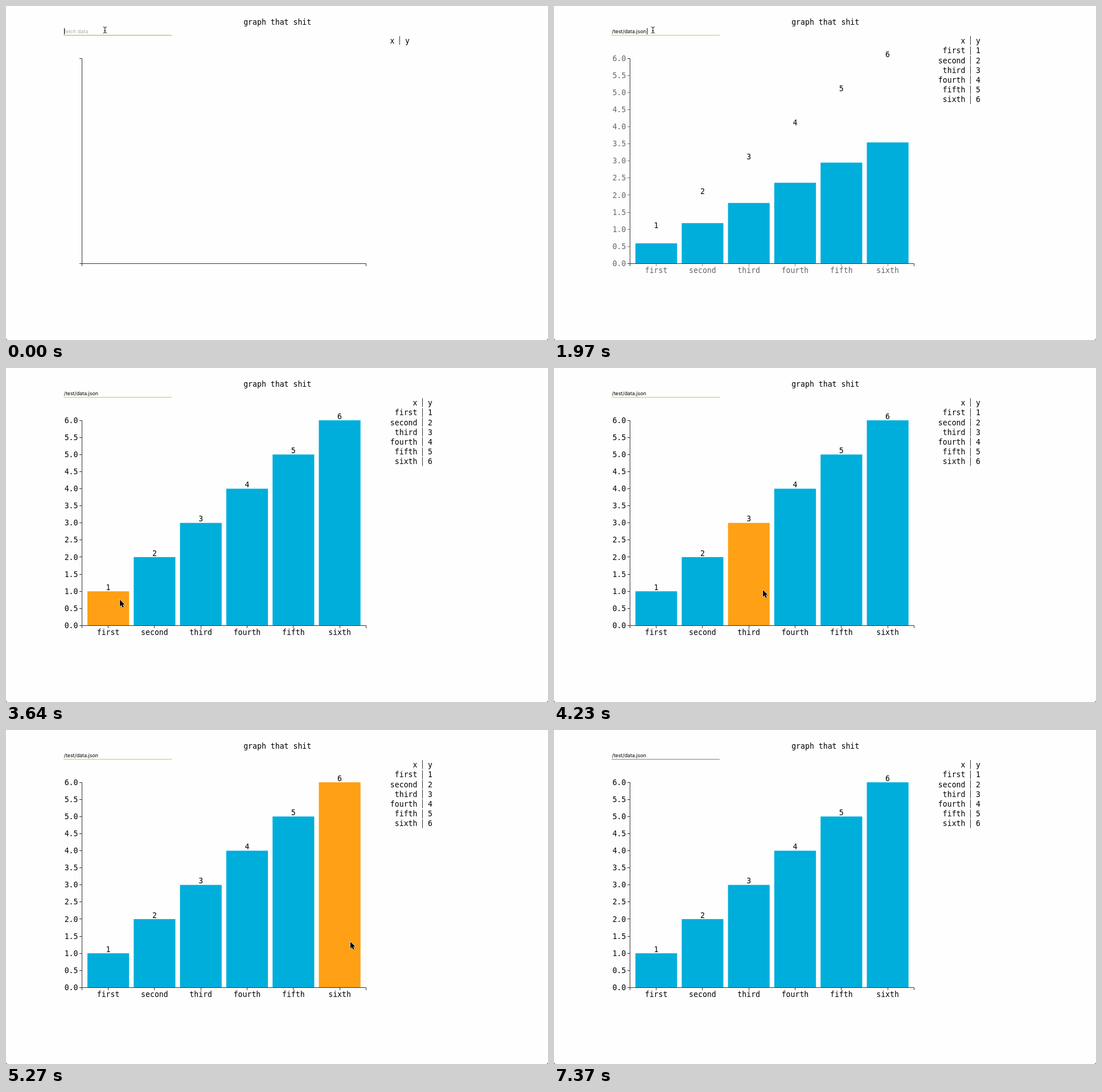
Write an HTML page that moves like this. It is 952 px wide and 588 px high and loops after 7470 ms.

```html
<!DOCTYPE html>
<html lang="en">
<head>
<meta charset="utf-8">
<title>Bar chart</title>
<style>
  html, body { margin: 0; width: 100%; height: 100%; overflow: hidden; background: #fefefe; }
  svg { display: block; width: 952px; height: 588px; }
  text { font: 13.2px "DejaVu Sans Mono", monospace; white-space: pre; }
  .input { font: 8.9px Inter, sans-serif; }
  .line { fill: none; stroke: #333; }
  .mid { text-anchor: middle; }
  .end { text-anchor: end; }
</style>
</head>
<body>
<svg id="stage" viewBox="0 0 952 588"></svg>
<script>
const LOOP = 7470;
const BLUE = '#00aedb', ORANGE = '#ffa015';
const NAMES = ['first', 'second', 'third', 'fourth', 'fifth', 'sixth'];
const BASE = 453.3, UNIT = 60.2, LEFT = 143, PITCH = 81.3, BAR = 73.2;
const LOADED = 1820, GROW_START = 1704, GROW_TIME = 500;

const stage = document.getElementById('stage');

function add(tag, attrs, parent = stage, content) {
  const el = document.createElementNS('http://www.w3.org/2000/svg', tag);
  for (const key in attrs) el.setAttribute(key, attrs[key]);
  if (content !== undefined) el.textContent = content;
  return parent.appendChild(el);
}
const label = (x, y, content, cls = '', parent = stage) =>
  add('text', { x, y, class: cls }, parent, content);
const path = (d, attrs = {}, parent = stage) => add('path', { d, class: 'line', ...attrs }, parent);
const show = (el, on) => el.setAttribute('visibility', on ? 'visible' : 'hidden');

// Window corners
path('M0 585V588H3Q1 588 0 585Z M952 585V588H949Q951 588 952 585Z', { class: '', fill: '#777' });

label(476.7, 33, 'graph that shit', 'mid');

// Input
const hint = label(102, 48.3, 'fetch data', 'input');
hint.setAttribute('fill', '#a9a9a9');
const typed = label(101.7, 48.3, '/test/data.json', 'input');
const underline = add('rect', { x: 101, y: 51, width: 190, height: 1 });
const caret = add('rect', { y: 39, width: 1, height: 11 });

// Chart
const chart = add('g', {});
const bars = NAMES.map((_, i) => add('rect', { x: LEFT + i * PITCH, width: BAR }, chart));
const ticks = add('g', {}, chart);
for (let k = 0; k <= 12; k++) {
  const y = BASE - k * UNIT / 2;
  label(126.5, y + 4.6, (k / 2).toFixed(1), 'end', ticks);
  path(`M129 ${Math.floor(y) + 0.5}H134`, {}, ticks);
}
NAMES.forEach((name, i) => {
  const x = LEFT + i * PITCH + BAR / 2;
  label(x, 470.3, name, 'mid', ticks);
  path(`M${Math.floor(x) + 0.5} 453V458`, {}, ticks);
  label(x, BASE - (i + 1) * UNIT - 2.4, i + 1, 'mid', chart);
});
path('M129 92.5H133.5V453.5H129 M133.5 458V453.5H632.5V458');

// Table
function makeTable(right, rows) {
  const g = add('g', {});
  rows.forEach(([a, b], i) => {
    const y = 66.1 + i * 17.2;
    label(right, y, a, 'end', g);
    label(right + 18.6, y, b, '', g);
    const top = Math.round(y - 12.6);
    path(`M${right + 9} ${top}V${top + 15.5}`, {}, g);
  });
  return g;
}
const emptyTable = makeTable(682.5, [['x', 'y']]);
const fullTable = makeTable(722.5, [['x', 'y'], ...NAMES.map((n, i) => [n, i + 1])]);

// Pointers
const beam = path(
  'M170.7 36.8Q173.8 36.8 173.8 39V45.6Q173.8 47.8 170.7 47.8' +
  'M176.9 36.8Q173.8 36.8 173.8 39M173.8 45.6Q173.8 47.8 176.9 47.8M172.2 43.6H175.4',
  { style: 'stroke:#111' });
const arrow = add('g', {});
const ARROW = 'M0 0V11.8L2.7 9.2L4.6 13.6L6.7 12.7L4.8 8.4H8.6Z';
path(ARROW, { class: '', fill: '#000', opacity: 0.18, transform: 'translate(.6 1.3)', stroke: '#000' }, arrow);
path(ARROW, { class: '', fill: '#000', stroke: '#fff', 'stroke-width': 1.1, 'paint-order': 'stroke' }, arrow);

// time, x, y of the arrow tip
const MOVES = [
  [2750, 179, 171], [2890, 173, 262], [3040, 160, 337], [3340, 162, 398],
  [3490, 177, 404], [3640, 200, 408], [3790, 229, 408], [3930, 267, 405],
  [4080, 316, 399], [4230, 367, 391], [4380, 456, 392], [4530, 495, 391],
  [4680, 530, 388], [4830, 570, 383], [4970, 595, 378], [5270, 605, 373],
  [5420, 615, 378], [5570, 655, 405], [5720, 712, 446], [5860, 775, 487],
  [6010, 830, 522], [6160, 880, 553], [6300, 911, 574], [6440, 920, 583]
];
const POINTER_GONE = 6590;
const CARET_FLIPS = [330, 780, 1380, 1820, 2300, 2750, 3340, 3790, 4230, 4830, 5270, 5720, 6300, 6740, 7180];
const UNDERLINE = [[0, '#c29a62'], [150, '#d3a96a'], [330, '#dcb572'], [7180, '#c59468'], [7370, '#a5705a']];
const GROWTH = [1820, 1970, 2120, 2300];

const latest = (table, t) => table.filter(row => row[0] <= t).pop();
const ease = u => u < 0.5 ? 4 * u ** 3 : 1 - 4 * (1 - u) ** 3;

function draw(t) {
  const loaded = t >= LOADED;
  show(hint, !loaded);
  show(typed, loaded);
  show(emptyTable, !loaded);
  show(fullTable, loaded);
  show(chart, loaded);

  underline.setAttribute('fill', latest(UNDERLINE, t)[1]);
  show(caret, CARET_FLIPS.filter(f => f <= t).length % 2 === 0);
  caret.setAttribute('x', loaded ? 163.3 : 102);

  const move = latest(MOVES, t);
  show(beam, !move);
  show(arrow, move && t < POINTER_GONE);
  if (move) arrow.setAttribute('transform', `translate(${move[1]} ${move[2]})`);

  const step = GROWTH.filter(g => g <= t).pop() || GROW_START;
  const p = ease(Math.min(1, (step - GROW_START) / GROW_TIME));
  ticks.setAttribute('opacity', p < 1 ? p + 0.015 : 1);
  bars.forEach((bar, i) => {
    const h = (i + 1) * UNIT * p, x = LEFT + i * PITCH;
    const over = move && move[1] >= x && move[1] <= x + BAR && move[2] >= BASE - h && move[2] <= BASE;
    bar.setAttribute('y', BASE - h);
    bar.setAttribute('height', h);
    bar.setAttribute('fill', over ? ORANGE : BLUE);
  });
}

function frame() {
  draw(performance.now() % LOOP);
  requestAnimationFrame(frame);
}
frame();
</script>
</body>
</html>
```
